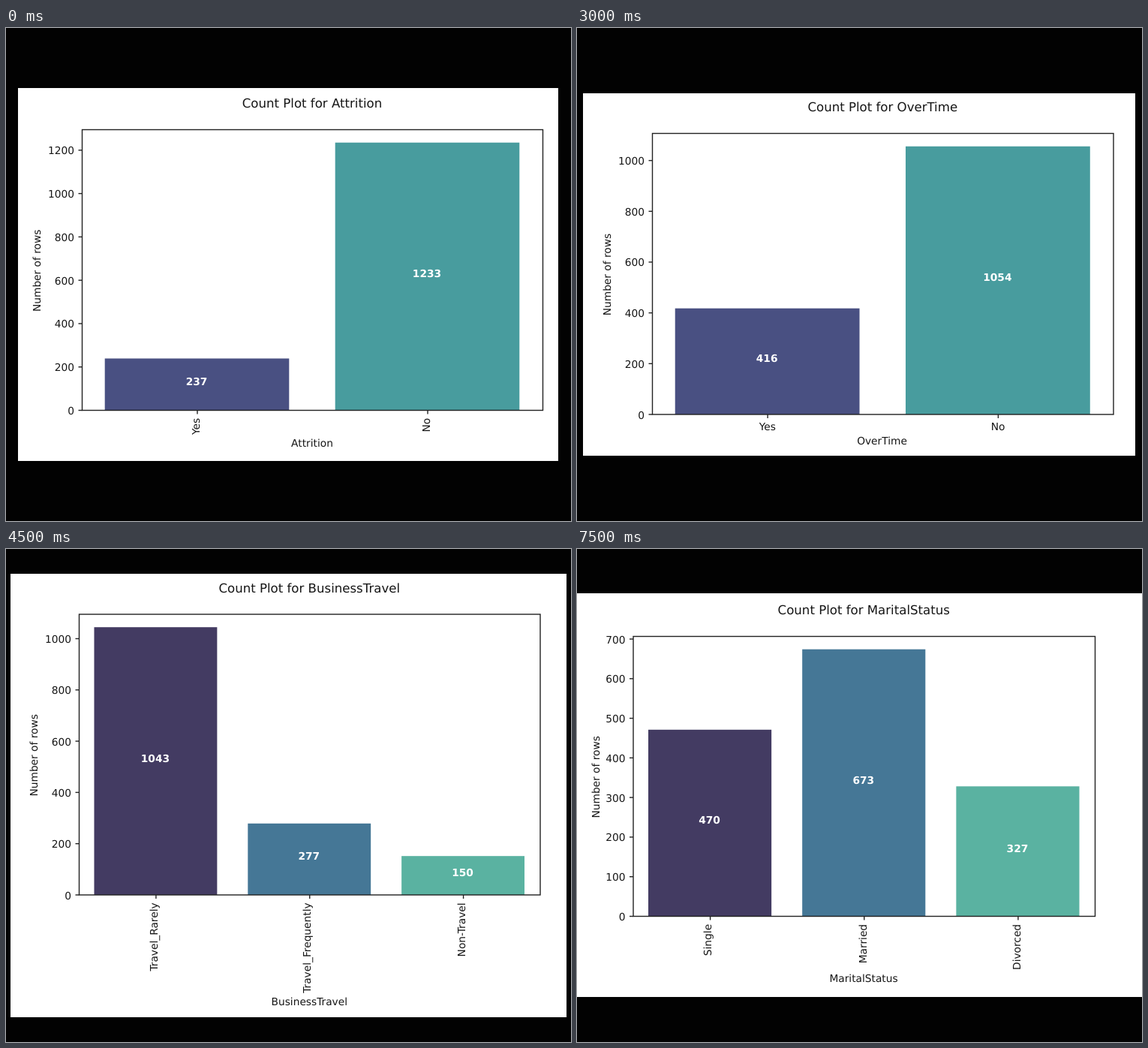
Recreate the animation shown at these times as an HTML page. Size 753 by 657 pixels, loop 8 s.

```html
<!DOCTYPE html>
<html lang="en">
<head>
<meta charset="utf-8">
<title>Count plots</title>
<style>
  html, body { margin: 0; width: 100%; height: 100%; overflow: hidden; background: #020202; }
  #strip { display: block; width: 753px; height: 3942px; animation: cut 8s step-end infinite; }
  @keyframes cut {
    0% { transform: translateY(0); }
    18.75% { transform: translateY(-657px); }
    37.5% { transform: translateY(-1314px); }
    56.25% { transform: translateY(-1971px); }
    75% { transform: translateY(-2628px); }
    93.75%, 100% { transform: translateY(-3285px); }
  }
  text {
    font: 13.75px "DejaVu Sans", sans-serif;
    fill: #161616;
    text-anchor: middle;
    text-rendering: geometricPrecision;
  }
  .title { font-size: 16.6px; }
  .end { text-anchor: end; }
  .value { font-weight: bold; fill: #fff; }
  .line { fill: none; stroke: #222; stroke-width: 1.4; }
</style>
</head>
<body>
<svg id="strip" viewBox="0 0 753 3942"></svg>
<script>
const STAGE_H = 657;
const PALETTES = {
  2: ['#495082', '#489c9e'],
  3: ['#433b62', '#457796', '#5ab2a1']
};

// card and axes: [left, top, right, bottom]; nameX/nameY place the x-axis name, sideX the y-axis name
const charts = [
  { name: 'Attrition', card: [16, 80, 736, 577], axes: [101.5, 135.5, 715.5, 509.5], step: 200,
    nameX: 408, nameY: 558, sideX: 46, bars: { Yes: 237, No: 1233 } },
  { name: 'Gender', card: [13, 67, 739, 590], axes: [93, 123.5, 708.5, 497], step: 200,
    nameX: 400.5, nameY: 573, sideX: 47, bars: { Female: 588, Male: 882 } },
  { name: 'OverTime', card: [8, 87, 744, 570], axes: [100.5, 140.5, 715, 515], step: 200, flat: true,
    nameX: 406.5, nameY: 555, sideX: 45.3, bars: { Yes: 416, No: 1054 } },
  { name: 'BusinessTravel', card: [6, 33, 747, 624], axes: [97.5, 87, 712, 461], step: 200,
    nameX: 404.3, nameY: 607.5, sideX: 42, bars: { Travel_Rarely: 1043, Travel_Frequently: 277, 'Non-Travel': 150 } },
  { name: 'Department', card: [9, 6, 743, 650], axes: [96.5, 62.5, 711, 436], step: 200,
    nameX: 403.5, nameY: 637, sideX: 41.5, bars: { Sales: 446, 'Research & Development': 961, 'Human Resources': 63 } },
  { name: 'MaritalStatus', card: [0, 59, 753, 597], axes: [75, 116.5, 690.5, 489.5], step: 100,
    nameX: 382, nameY: 577, sideX: 29.5, bars: { Single: 470, Married: 673, Divorced: 327 } }
];

const rect = (l, t, r, b, attrs) =>
  `<rect x="${l}" y="${t}" width="${r - l}" height="${b - t}" ${attrs}/>`;
const line = path => `<path class="line" d="${path}"/>`;
const text = (x, y, label, cls = '') =>
  `<text class="${cls}" x="${x}" y="${y}">${String(label).replace('&', '&amp;')}</text>`;
const upright = (x, y, label, cls) =>
  `<g transform="translate(${x} ${y}) rotate(-90)">${text(0, 0, label, cls)}</g>`;

function drawChart({ name, card, axes, step, flat, nameX, nameY, sideX, bars }, index) {
  const [left, top, right, bottom] = axes;
  const entries = Object.entries(bars);
  const yMax = 1.05 * Math.max(...Object.values(bars));
  const toY = value => bottom - value * (bottom - top) / yMax;
  const slot = (right - left) / entries.length;
  const colors = PALETTES[entries.length];
  let out = rect(...card, 'fill="#fff"');

  entries.forEach(([label, value], i) => {
    const x = left + slot * (i + 0.5);
    const barX = x - 0.5;
    const y = toY(value) - 0.6;
    out += rect(barX - slot * 0.4, y, barX + slot * 0.4, bottom, `fill="${colors[i]}"`);
    out += text(barX - 0.5, (y + bottom) / 2 + 1, value, 'value');
    out += line(`M${x} ${bottom}v5`);
    out += flat
      ? text(x - 0.3, bottom + 21, label)
      : upright(x + (/[gpy_]/.test(label) ? 1.7 : 2.8), bottom + 10.4, label, 'end');
  });

  for (let value = 0; value <= yMax; value += step) {
    out += line(`M${left} ${toY(value)}h-5`);
    out += text(left - 10.6, toY(value) + 5.5, value, 'end');
  }

  out += rect(...axes, 'class="line"');
  out += text((left + right) / 2 - 0.5, top - 29.5, `Count Plot for ${name}`, 'title');
  out += text(nameX, nameY, name);
  out += upright(sideX, (top + bottom) / 2 + 0.8, 'Number of rows');
  return `<g transform="translate(0 ${index * STAGE_H})">${out}</g>`;
}

document.getElementById('strip').innerHTML = charts.map(drawChart).join('');
</script>
</body>
</html>
```
